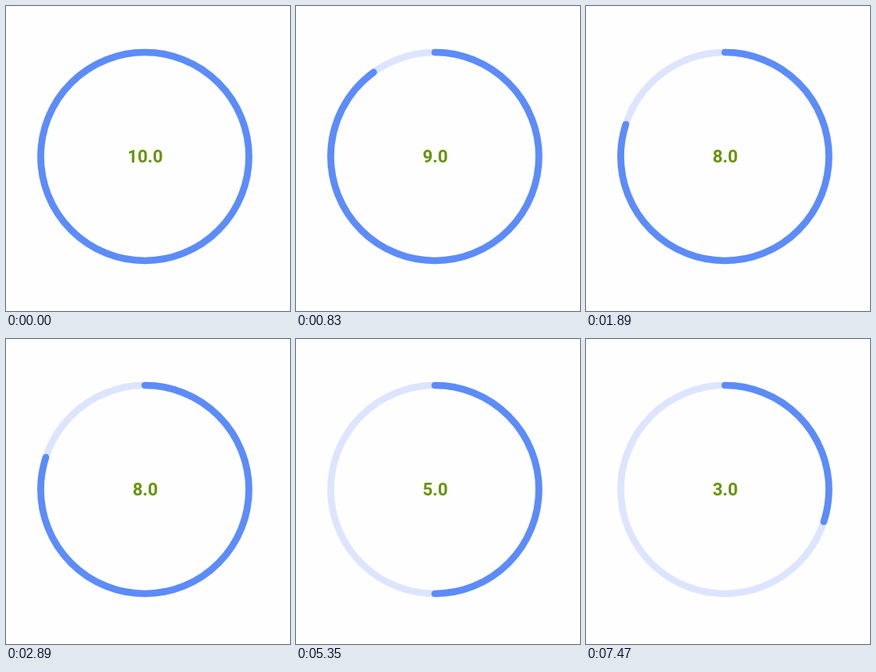
These frames come from a looping animation (356x382 px, 8000 ms). An HTML page:

```html
<!DOCTYPE html>
<html lang="en">
<head>
<meta charset="utf-8">
<title>Countdown ring</title>
<style>
  html, body { margin: 0; width: 100%; height: 100%; overflow: hidden; background: #fefefe; }
  svg { display: block; }
  circle { fill: none; stroke-width: 8.6; }
  .track { stroke: #dde5fe; }
  .arc { stroke: #5c8cfa; stroke-linecap: round; }
  text { font: bold 22px Roboto, sans-serif; fill: #669408; text-anchor: middle; }
</style>
</head>
<body>
<svg width="356" height="382" viewBox="0 0 356 382">
  <g transform="translate(174 188.5) rotate(-90)">
    <circle class="track" r="130.5"/>
    <circle class="arc" r="130.5" pathLength="10"/>
  </g>
  <text x="174.5" y="196">10.0</text>
</svg>
<script>
  const LOOP = 8000;
  const START = 10;
  // Moments at which the counter drops by one
  const ticks = [490, 1770, 2970, 4170, 5350, 6450, 7450];
  const arc = document.querySelector('.arc');
  const label = document.querySelector('text');

  function draw() {
    const time = performance.now() % LOOP;
    const value = START - ticks.filter(tick => time >= tick).length;
    arc.setAttribute('stroke-dasharray', value === START ? 'none' : `${value} ${START}`);
    label.textContent = value.toFixed(1);
    requestAnimationFrame(draw);
  }
  draw();
</script>
</body>
</html>
```
